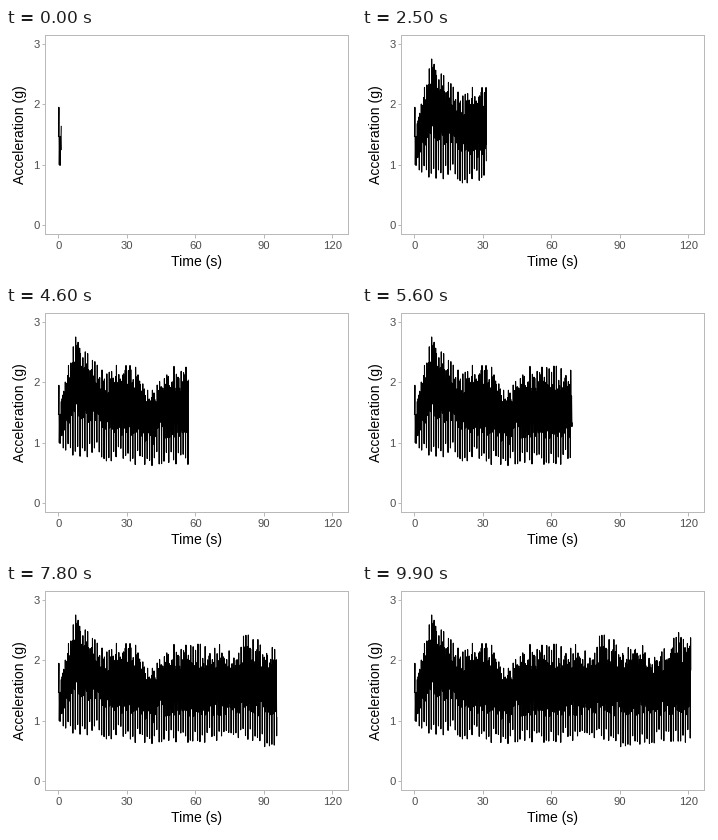
A matplotlib script that plays this animation: 350x250 px, repeating every 10000 ms.

```python
import numpy as np
import matplotlib.pyplot as plt
from matplotlib.animation import FuncAnimation

W, H, DPI = 350, 250, 100
FRAMES, INTERVAL = 100, 100
DURATION = 121.0  # seconds of signal
STRIDE = 1.05     # seconds per stride
BEATS = 6         # samples per stride
PX = 72 / DPI     # points per pixel
GREY, TICK_TEXT = "#b9b9b9", "#4d4d4d"

plt.rcParams["font.family"] = "Liberation Sans"

# envelopes as (time, acceleration): peaks, shallow valleys, deep dips
TOP = [(0, 1.6), (2, 2.0), (6, 2.5), (8, 2.95), (10, 2.6), (21, 2.15),
       (31, 2.45), (40, 1.85), (50, 2.3), (78, 2.25), (82, 2.48),
       (92, 2.25), (96, 2.4), (105, 2.05), (116, 2.55), (121, 2.4)]
FLOOR = [(0, 1.1), (2, 1.15), (8, 1.55), (20, 1.3), (38, 1.15), (40, 1.0),
         (44, 1.2), (121, 1.2)]
DEPTH = [(0, 0.85), (9, 0.72), (17, 0.8), (22, 0.64), (30, 0.7), (39, 0.55),
         (45, 0.65), (80, 0.62), (92, 0.55), (110, 0.66), (121, 0.64)]


def make_signal():
    rng = np.random.default_rng(12)
    dt = STRIDE / BEATS
    t = np.arange(0, DURATION + dt, dt)
    beat = np.arange(t.size) % BEATS
    top, floor, depth = (np.interp(t, *zip(*env)) for env in (TOP, FLOOR, DEPTH))

    # each stride: deep dip, strong peak, valley, weak peak, valley, medium peak
    reach = np.array([0, 0.6, 0, 0.3, 0, 0.45])[beat]
    mid = floor + 0.25
    high = mid + (top - mid) * (reach + rng.uniform(0, 0.4, t.size))
    low = floor + rng.uniform(-0.13, 0.15, t.size)
    y = np.where(beat % 2, high, low)
    dip = depth + 0.27 * rng.random(t.size) ** 1.3
    y = np.where((beat == 0) & (t > STRIDE), dip, y)
    y[:BEATS] = 1.46, 1.95, 1.0, 1.46, 0.99, 1.47
    return t, y


def label(x, y, text, **kw):
    fig.text(x / W, 1 - y / H, text, fontsize=14 * PX, ha="center",
             va="baseline", rotation_mode="anchor", color="black", **kw)


fig = plt.figure(figsize=(W / DPI, H / DPI), dpi=DPI, facecolor="white")
left, right, top, bottom = 39.3, 342.3, 7.3, 206.3
ax = fig.add_axes([left / W, 1 - bottom / H, (right - left) / W, (bottom - top) / H])
ax.set(xlim=(-5.78, 126.92), ylim=(-0.149, 3.14),
       xticks=range(0, 121, 30), yticks=range(4))
ax.tick_params(length=3.5 * PX, width=PX, color=GREY,
               labelsize=11.2 * PX, labelcolor=TICK_TEXT)
ax.tick_params(axis="x", pad=3.6 * PX)
ax.tick_params(axis="y", pad=2 * PX)
for spine in ax.spines.values():
    spine.set(color=GREY, linewidth=PX)

label(190.6, 238, "Time (s)")
label(18, 106.4, "Acceleration (g)", rotation=90)

times, accel = make_signal()
line, = ax.plot([], [], color="black", linewidth=1.07 * PX,
                solid_joinstyle="round", solid_capstyle="butt")


def update(i):
    now = DURATION * (i + 1) / FRAMES
    shown = times < now
    line.set_data(np.append(times[shown], now),
                  np.append(accel[shown], np.interp(now, times, accel)))
    return line,


anim = FuncAnimation(fig, update, frames=FRAMES, interval=INTERVAL,
                     repeat=True, repeat_delay=0, blit=False)
plt.show()
```
